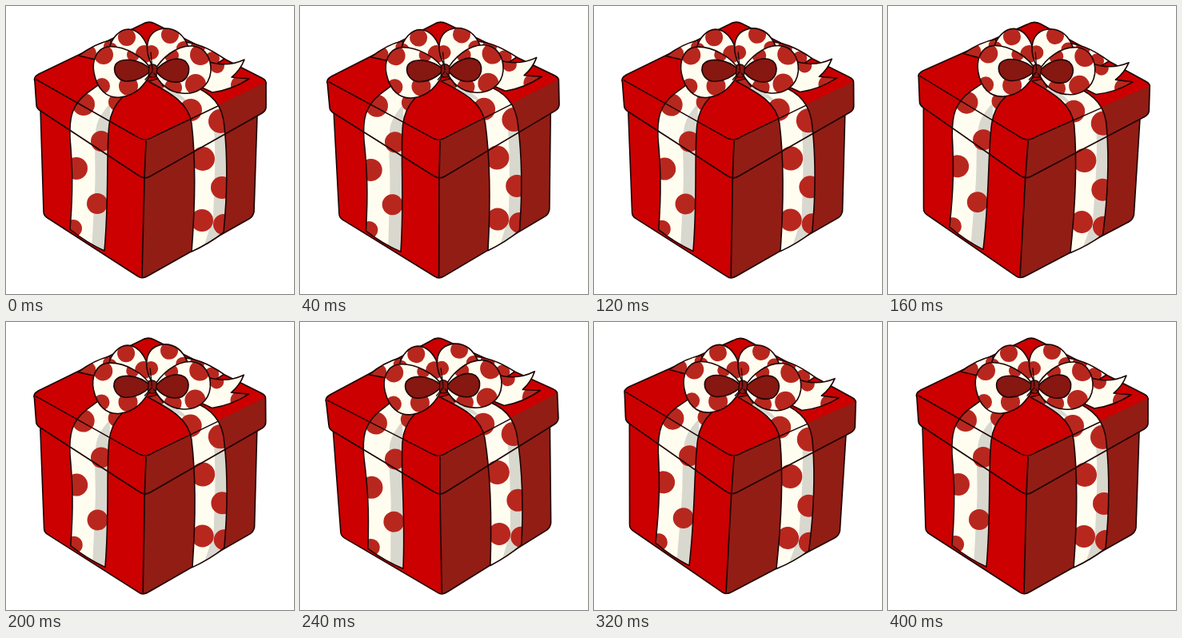
An HTML page with a canvas for the animation above (0.96 s loop, 360 by 360 pixels).

```html
<!DOCTYPE html>
<html>
<head>
<meta charset="utf-8">
<style>
html, body { margin: 0; width: 100%; height: 100%; overflow: hidden; background: #fff; }
canvas { display: block; }
</style>
</head>
<body>
<canvas id="stage" width="360" height="360"></canvas>
<script>
const ctx = document.getElementById('stage').getContext('2d');
const RED = '#cc0000', DARK = '#921d15', INK = '#1c0303';
const CREAM = '#fffdf0', SHADE = '#d9d8cf', SPOT = '#b8271e', HOLE = '#861711';

const LOOP = 960, STEP = 40;
const PIVOT = [176, 171];
// Tilt in degrees at successive 80 ms marks; linear in between.
const TILTS = [0, -2.5, 1.7, -2.5, 1.7, 0];

function fill(path, color) {
  ctx.fillStyle = color;
  ctx.fill(new Path2D(path));
}

function line(path, width = 1.6) {
  ctx.strokeStyle = INK;
  ctx.lineWidth = width;
  ctx.stroke(new Path2D(path));
}

function shape(path, color, width) {
  fill(path, color);
  line(path, width);
}

// Cream fabric with optional shading and round spots clipped to its outline.
function fabric(path, spots, shades = []) {
  fill(path, CREAM);
  ctx.save();
  ctx.clip(new Path2D(path));
  shades.forEach(s => fill(s, SHADE));
  ctx.fillStyle = SPOT;
  for (const [x, y, r] of spots) {
    ctx.beginPath();
    ctx.arc(x, y, r, 0, Math.PI * 2);
    ctx.fill();
  }
  ctx.restore();
  line(path);
}

function drawBox() {
  fill('M43 127 L47 257 Q47 262 52 265 L165 338 Q170 341 170 339 L174 212 Z', RED);
  fill('M173 212 L170 340 Q173 341 178 337 L304 266 Q309 263 310 257 L314 132 Z', DARK);
  line('M43 128 L47 257 Q47 262 52 265 L165 338 Q170 342 178 337 L304 266 Q309 263 310 257 L314 137');
  fill('M36 94 Q34 89 41 85 L170 23 Q178 18 186 22 L320 90 Q326 93 325 98 L325 126 Q325 131 320 134 L180 213 Q173 217 166 212 L43 131 Q38 128 38 123 Z', RED);
  fill('M175 167 L325 95 L325 126 Q325 131 320 134 L180 213 Q175 216 173 215 Z', DARK);
}

function drawRibbons() {
  fabric('M176 93 C152 107 133 118 129 148 C125 185 129 240 123 306 Q101 296 80 279 C84 230 83 200 80 165 C79 140 82 124 101 109 L130 88 Z',
    [[97, 123, 14], [139, 120, 11], [119, 169, 13], [88, 203, 14], [114, 247, 13], [84, 278, 11]],
    ['M178 92 C146 105 126 121 115 144 C108 161 113 198 111 230 L107 308 L130 308 L130 120 Z']);
  fabric('M178 94 C204 108 228 120 232 147 C237 190 237 242 232 307 Q254 297 272 283 C277 232 277 190 273 151 C271 123 257 109 232 99 L205 87 Z',
    [[231, 130, 14], [268, 144, 15], [246, 191, 15], [270, 227, 14], [245, 268, 14], [272, 273, 13], [188, 99, 9]],
    ['M258 132 C264 180 260 230 259 265 L247 301 L280 290 L280 120 Z', 'M178 94 L198 105 L222 119 L232 143 L239 136 Q224 110 198 100 Z']);
}

function drawEdges() {
  line('M38 92 L163 163 Q169 167 174 167 Q179 167 185 163 L265 125', 1.5);
  line('M175 169 L173 215 L170 338', 1.7);
  line('M36 94 Q34 89 41 85 L170 23 Q178 18 186 22 L320 90 Q326 93 325 98 L325 126 Q325 131 320 134 L180 213 Q173 217 166 212 L43 131 Q38 128 38 123 Z', 1.7);
}

function drawBow() {
  fabric('M91 62 Q111 47 130 43 L137 54 L112 67 Z', [[103, 59, 10], [128, 50, 6]]);
  fabric('M216 45 Q242 44 273 66 L256 77 L237 67 Z', [[240, 51, 9], [258, 66, 9]]);
  fabric('M248 68 Q274 78 298 67 Q293 80 282 89 L304 91 Q282 105 258 108 L245 102 Z',
    [[264, 75, 9], [293, 99, 12]]);
  fabric('M183 81 C181 56 173 30 153 29 C142 29 132 40 129 53 L159 61 Z',
    [[151, 39, 11], [173, 60, 11], [132, 53, 7]]);
  fabric('M186 80 C171 57 173 30 199 28 Q219 28 228 51 L204 64 Z',
    [[205, 36, 11], [182, 58, 9], [222, 53, 9]]);
  fabric('M183 82 C174 64 148 49 127 51 C113 53 107 69 110 84 C114 104 126 116 143 114 C163 112 173 99 183 82 Z',
    [[122, 61, 12], [120, 100, 10], [153, 100, 12], [159, 61, 8]]);
  fabric('M185 82 C194 65 213 49 233 50 C249 51 257 66 256 82 C254 101 238 111 220 109 C203 108 191 96 185 82 Z',
    [[243, 61, 13], [237, 98, 13], [209, 102, 11], [207, 62, 9]]);
  shape('M182 80 C166 65 144 64 137 73 C133 81 138 92 149 94 C163 95 174 88 182 80 Z', HOLE);
  shape('M187 81 C197 68 214 62 224 69 C232 76 229 89 220 94 C207 98 195 92 187 81 Z', HOLE);
  shape('M179 74 Q185 71 189 76 L188 88 Q182 91 178 87 Z', HOLE, 1.2);
  line('M183 82 L174 92 M185 84 L197 101 M183 80 L181 58', 1.3);
}

function tiltAt(time) {
  const steps = Math.floor((time % LOOP) / STEP);
  const mark = Math.min(steps / 2, TILTS.length - 1);
  const i = Math.floor(mark);
  const next = TILTS[Math.min(i + 1, TILTS.length - 1)];
  return TILTS[i] + (next - TILTS[i]) * (mark - i);
}

function frame() {
  ctx.setTransform(1, 0, 0, 1, 0, 0);
  ctx.fillStyle = '#fff';
  ctx.fillRect(0, 0, 360, 360);
  ctx.lineJoin = ctx.lineCap = 'round';
  ctx.translate(...PIVOT);
  ctx.rotate(tiltAt(performance.now()) * Math.PI / 180);
  ctx.translate(-PIVOT[0], -PIVOT[1]);
  drawBox();
  drawRibbons();
  drawEdges();
  drawBow();
  requestAnimationFrame(frame);
}
frame();
</script>
</body>
</html>
```
